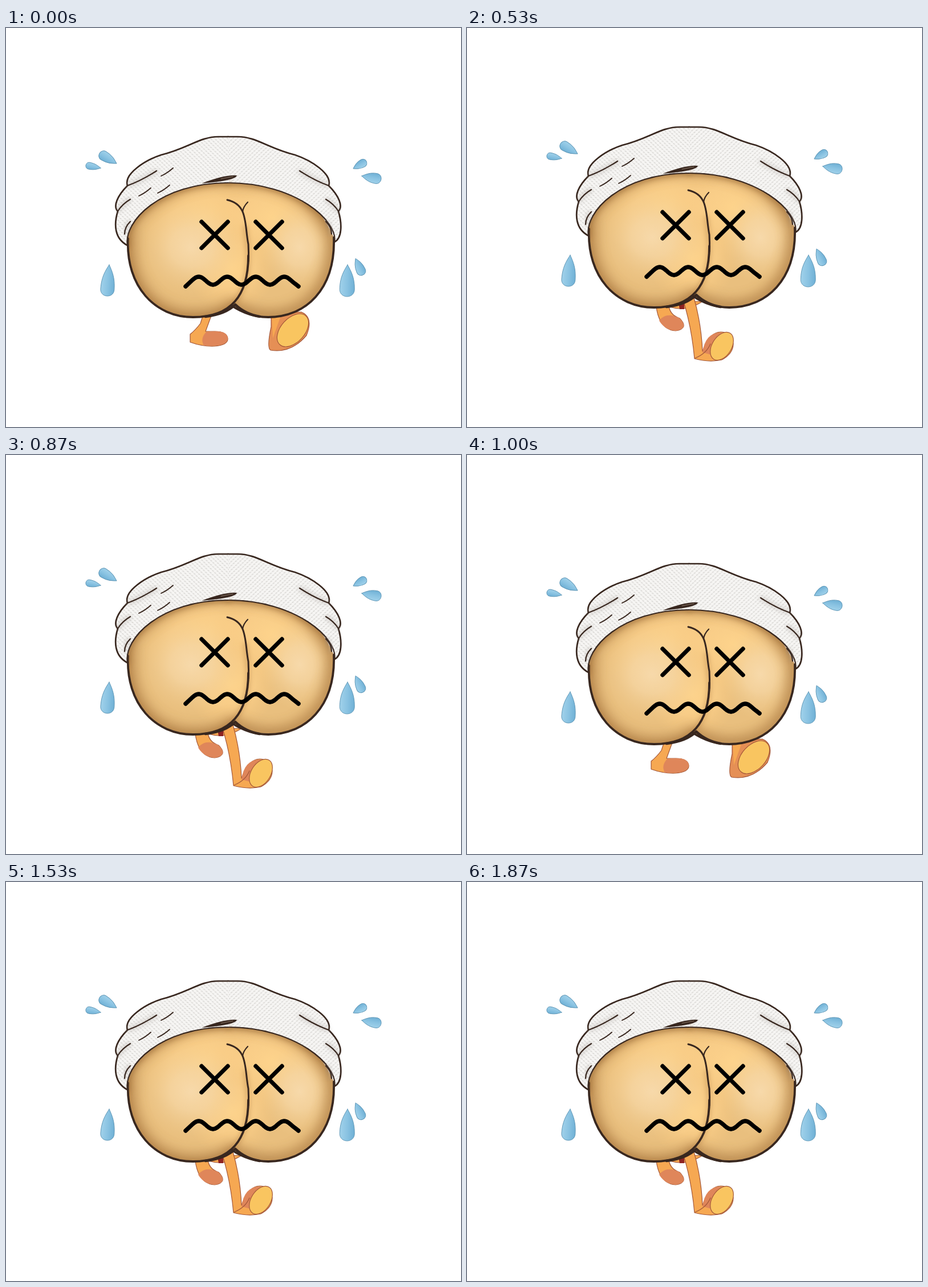
An HTML page that plays this animation: 798 px wide and 701 px high, repeating every 1990 ms.

```html
<!DOCTYPE html>
<html lang="en">
<head>
<meta charset="utf-8">
<title>Tired runner</title>
<style>
html, body { margin: 0; width: 100%; height: 100%; overflow: hidden; background: #fff; }
svg { display: block; width: 100vw; height: 100vh; }
</style>
</head>
<body>
<svg viewBox="0 0 798 701" fill="none" stroke-linecap="round" stroke-linejoin="round">
  <defs>
    <radialGradient id="shine"><stop offset="0" stop-color="#f7d9aa"/><stop offset=".4" stop-color="#f5d5a2" stop-opacity=".8"/><stop offset="1" stop-color="#f1cb8d" stop-opacity="0"/></radialGradient>
    <radialGradient id="warm"><stop offset="0" stop-color="#fed48c"/><stop offset=".5" stop-color="#fcd08a" stop-opacity=".75"/><stop offset="1" stop-color="#f8c980" stop-opacity="0"/></radialGradient>
    <linearGradient id="water"><stop stop-color="#a0d1ea"/><stop offset=".5" stop-color="#8ac3e2"/><stop offset="1" stop-color="#6fb0d5"/></linearGradient>
    <pattern id="knit" width="8" height="7" patternUnits="userSpaceOnUse" patternTransform="rotate(3)">
      <rect width="8" height="7" fill="#f6f5f3"/>
      <path d="M.8 1.2l2.4 1.2M4.8 4.7l2.4 1.2" stroke="#d5d3d0" stroke-width="1.3"/>
    </pattern>
    <filter id="wide" x="-20%" y="-20%" width="140%" height="140%"><feGaussianBlur stdDeviation="11"/></filter>
    <filter id="soft" x="-20%" y="-20%" width="140%" height="140%"><feGaussianBlur stdDeviation="4"/></filter>
    <clipPath id="skinClip"><path id="skinEdge"/></clipPath>
  </defs>
  <g id="stride"></g>
  <g id="hop"></g>
  <g id="body"></g>
</svg>
<script>
const $ = id => document.getElementById(id);
const INK = "#38271f", RIM = "#a4583a";
const ORANGE = "#f6a852", RUST = "#df865a", YELLOW = "#f9c560";

function add(parent, tag, attrs = {}) {
  const el = document.createElementNS("http://www.w3.org/2000/svg", tag);
  for (const k in attrs) el.setAttribute(k, attrs[k]);
  return parent.appendChild(el);
}
const fill = (g, d, color, extra) => add(g, "path", { d, fill: color, ...extra });
const line = (g, d, width, color = INK, extra) => add(g, "path", { d, stroke: color, "stroke-width": width, ...extra });
const oval = (g, cx, cy, rx, ry, color, turn = 0, extra) =>
  add(g, "ellipse", { cx, cy, rx, ry, fill: color, transform: `rotate(${turn} ${cx} ${cy})`, ...extra });
const edge = { stroke: RIM, "stroke-width": 1.2 };

function drawStride(g) {
  fill(g, "M347 500L341 519Q332 531 323 538V552Q345 560 366 559Q389 557 389 546Q388 533 366 533H350L362 500Z", ORANGE, edge);
  fill(g, "M347 558Q340 546 351 534Q389 529 389 546Q387 561 347 558Z", RUST);
  fill(g, "M465 500V525Q457 562 464 566Q500 572 527 540Q540 508 518 499Z", "#e58f55", edge);
  fill(g, "M466 500H484L468 545Z", ORANGE);
  oval(g, 503, 531, 21, 34, YELLOW, 42, edge);
}

function drawHop(g) {
  fill(g, "M340 482Q375 505 414 480Z", ORANGE, edge);
  fill(g, "M371 483L373 494H381V482Z", "#8e2222");
  fill(g, "M331 480Q334 530 366 532Q390 528 373 510Q352 503 354 480Z", ORANGE, edge);
  fill(g, "M337 514Q350 498 373 510Q390 528 366 532Q346 530 337 514Z", RUST);
  fill(g, "M378 474Q394 525 399 581Q425 588 447 583Q467 572 467 555Q463 534 445 534Q425 534 413 568Q411 520 398 474Z", ORANGE, edge);
  fill(g, "M413 570Q418 534 447 535L428 574Z", RUST);
  oval(g, 447, 559, 17, 27, YELLOW, 32, edge);
  line(g, "M400 580Q420 572 427 555", 1.3, RIM);
}

function drawSkin(g) {
  const left = "M214 370C210 455 262 508 328 508C395 508 425 470 425 400";
  const right = "C414 500 436 508 460 508C525 508 578 460 575 368";
  const crease = "M388 302C425 310 418 345 425 380Q426 395 425 410";
  const shape = "M214 340V370C210 455 262 508 328 508C362 508 384 500 396 488" + right + "Q530 262 390 262Q280 262 214 340Z";
  $("skinEdge").setAttribute("d", shape);
  const skin = add(g, "g", { "clip-path": "url(#skinClip)" });
  fill(skin, shape, "#e9bf7e");
  for (const [x, tilt] of [[345, -15], [470, 15]]) oval(skin, x, 335, 110, 85, "url(#warm)", tilt);
  oval(skin, 395, 420, 80, 80, "url(#warm)");
  oval(skin, 325, 385, 92, 85, "url(#shine)");
  oval(skin, 515, 385, 70, 80, "url(#shine)");
  line(skin, shape, 22, "#a3713a", { filter: "url(#wide)", opacity: .75 });
  line(skin, left + "L420 350", 7, "#a9733a", { filter: "url(#soft)", opacity: .4 });
  line(g, left, 3.8);
  line(g, "M396 488" + right, 3.8);
  line(g, "M350 507Q385 503 402 486Q420 503 445 507", 4.5);
  line(g, crease, 3);
  line(g, "M424 306Q416 314 415 323", 2.2);
}

// One side of the cloth; the hem ends at (x, y).
function drawClothHalf(g, x, y) {
  const rim = `M390 191H372C340 191 318 212 272 223C245 232 206 256 213 277C196 294 187 313 196 322C189 345 190 370 ${x} ${y}`;
  const hem = `C${x - 7} 340 270 272 390 272`;
  line(g, `M${x} ${y}` + hem, 7, "#8a5c2a", { filter: "url(#soft)", opacity: .5, "clip-path": "url(#skinClip)" });
  fill(g, rim + hem + "H391V191Z", "url(#knit)");
  line(g, rim, 2.7);
  line(g, `M${x} ${y}` + hem, 2.2);
  for (const d of ["M213 277Q238 268 264 251", "M196 322Q204 309 218 301", "M208 362Q208 350 218 340"]) {
    line(g, d, 5, "#9a938d", { filter: "url(#soft)", opacity: .5 });
    line(g, d, 2.2);
  }
}

function drawCloth(g) {
  drawClothHalf(add(g, "g", { transform: "translate(779 0) scale(-1 1)" }), 203, 376);
  drawClothHalf(g, 213, 382);
  for (const [x, y] of [[293, 246], [287, 276], [254, 281]]) line(g, `M${x} ${y}q-10 9 -21 14`, 1.9);
  fill(g, "M343 273Q385 257 405 259Q404 268 343 273Z", INK);
  line(g, "M377 265L398 261", 1.1, "#8a7767");
}

function drawFace(g) {
  for (const x of [366, 461]) line(g, `M${x - 23} 340.5l46 46m0-46l-46 46`, 7.4, "#000");
  let mouth = "M315 454";
  for (let x = 326; x <= 502; x += 2) mouth += `L${x} ${444 - 7 * Math.cos((x - 338) * Math.PI / 25)}`;
  line(g, mouth + "L513 454", 7.4, "#000");
}

// A drop with its tip at (x, y), reaching (dx, dy) from there.
function drop(g, x, y, dx, dy, width) {
  const len = Math.hypot(dx, dy), r = width / 2, low = len - r;
  const turn = Math.atan2(dy, dx) * 180 / Math.PI - 90;
  const at = add(g, "g", { transform: `translate(${x} ${y}) rotate(${turn})` });
  fill(at, `M0 0C${r * .5} ${len * .2} ${r} ${len * .4} ${r} ${low}C${r} ${len + r * .32} ${-r} ${len + r * .32} ${-r} ${low}C${-r} ${len * .4} ${-r * .5} ${len * .2} 0 0Z`,
    "url(#water)", { stroke: "#5b93b3", "stroke-width": .9 });
}

function drawSweat(g) {
  drop(g, 194, 238, -30, -18, 17);
  drop(g, 166, 246, -26, -5, 12);
  drop(g, 609, 247, 23, -13, 14);
  drop(g, 624, 260, 34, 6, 18);
  drop(g, 181, 416, -4, 55, 24);
  drop(g, 599, 416, -1, 56, 26);
  drop(g, 613, 405, 13, 29, 16);
}

drawStride($("stride"));
drawHop($("hop"));
for (const draw of [drawSkin, drawCloth, drawFace, drawSweat]) draw($("body"));

const LOOP = 1990, STEPS = 6, LOW_TIME = 200;
// Steps begin every third of a second, rounded to 10 ms.
const stepStart = k => Math.round(k * 100 / 3) * 10;

function render(now) {
  const t = now % LOOP;
  let k = STEPS - 1;
  while (stepStart(k) > t) k--;
  const up = t - stepStart(k) >= LOW_TIME;
  $("body").setAttribute("transform", `translate(0 ${up ? -17 : 0})`);
  $("stride").setAttribute("display", up ? "none" : "inline");
  $("hop").setAttribute("display", up ? "inline" : "none");
}

const start = performance.now();
function tick() {
  render(Math.max(0, performance.now() - start));
  requestAnimationFrame(tick);
}
tick();
</script>
</body>
</html>
```
